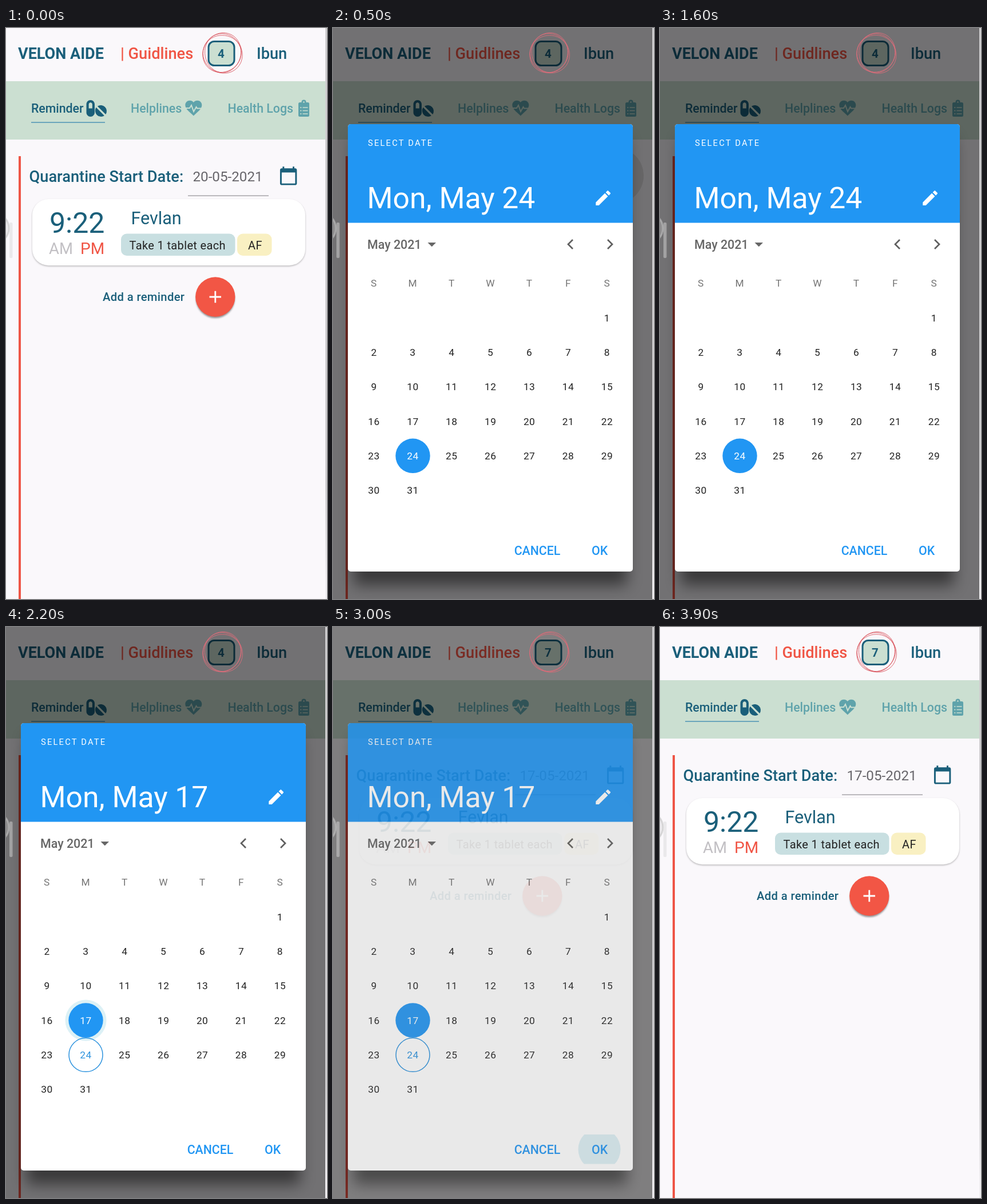
These frames come from a looping animation (561x998 px, 4000 ms). An HTML page:

```html
<!DOCTYPE html>
<html lang="en">
<head>
<meta charset="utf-8">
<title>Quarantine date picker</title>
<style>
html, body { margin: 0; width: 100%; height: 100%; overflow: hidden; background: #faf8fb; }
svg { display: block; width: 561px; height: 998px; font-family: Roboto, sans-serif; }
.m { font-weight: 500; }
.mid { text-anchor: middle; }
</style>
</head>
<body>
<svg viewBox="0 0 561 998">
  <defs>
    <filter id="soft" x="-20%" y="-20%" width="140%" height="140%"><feGaussianBlur stdDeviation="1.6"/></filter>
    <filter id="wide" x="-20%" y="-20%" width="140%" height="140%"><feGaussianBlur stdDeviation="13"/></filter>
    <linearGradient id="edge" x1="0" y1="0" x2="0" y2="1">
      <stop offset=".8" stop-color="#cfced0"/><stop offset=".97" stop-color="#f1eff2"/>
    </linearGradient>
    <clipPath id="card"><rect x="26" y="168" width="498" height="782" rx="5"/></clipPath>
    <clipPath id="btn"><rect x="420" y="887" width="92" height="51.5" rx="5"/></clipPath>
  </defs>

  <g id="page" fill="#1a5f7a">
    <rect width="561" height="998" fill="#faf8fb"/>
    <rect y="93" width="558" height="102" fill="#cbdfd1"/>
    <g class="m" font-size="27.2">
      <text x="21" y="54" font-size="27" font-weight="700">VELON AIDE</text>
      <text x="200" y="54" fill="#f05545">| Guidlines</text>
      <text x="438" y="54">Ibun</text>
    </g>
    <rect x="354" y="23.5" width="45" height="42" rx="10" fill="#cbdfd1" stroke="#1a5f7a" stroke-width="3"/>
    <text id="count" class="mid" x="376" y="52" font-size="20.5" font-weight="700">4</text>

    <g class="m" font-size="21.3">
      <text x="44" y="148">Reminder</text>
      <g fill="#5fa3ab">
        <text x="218" y="148">Helplines</text>
        <text x="387.5" y="148">Health Logs</text>
      </g>
    </g>
    <rect x="44" y="164" width="129" height="2" fill="#6ba5bb"/>
    <g transform="translate(140.5 124) scale(.0645)">
      <path fill-rule="evenodd" d="M112 32C50 32 0 82 0 144v224c0 62 50 112 112 112s112-50 112-112V144C224 82 174 32 112 32zm48 224H64V144c0-26 22-48 48-48s48 22 48 48z"/>
      <path d="M264 230a160 160 0 0 0 222 222zM301 198a160 160 0 0 1 222 222z"/>
    </g>
    <g fill="#5fa3ab">
      <path transform="translate(310.4 122.5) scale(1.45)" d="M12 21.3l-1.4-1.3C5.4 15.4 2 12.3 2 8.5 2 5.4 4.4 3 7.5 3c1.7 0 3.4.8 4.5 2.1C13.1 3.8 14.8 3 16.5 3 19.6 3 22 5.4 22 8.5c0 3.8-3.4 6.9-8.6 11.5z"/>
      <path d="M313 140h8l3-5 4 11 4.5-8 1.5 2.5h8" fill="none" stroke="#cbdfd1" stroke-width="2"/>
      <rect x="511" y="130" width="19" height="25" rx="2.5"/>
      <circle cx="520.5" cy="129.5" r="4"/>
      <circle cx="520.5" cy="129.5" r="1.3" fill="#cbdfd1"/>
      <path d="M514 139h2.5m2 0h9M514 144.5h2.5m2 0h9M514 150h2.5m2 0h9" stroke="#cbdfd1" stroke-width="1.7"/>
    </g>

    <rect x="22" y="224" width="4" height="774" fill="#ee5546"/>
    <text class="m" x="40.5" y="268.5" font-size="27.2">Quarantine Start Date:</text>
    <text id="date" x="326.5" y="267.5" font-size="24.2" fill="#68666b">20-05-2021</text>
    <rect x="318" y="292.5" width="141" height="1.3" fill="#9b999d"/>
    <path transform="translate(476 240.8) scale(1.47)" d="M20 3h-1V1h-2v2H7V1H5v2H4c-1.1 0-2 .9-2 2v16c0 1.1.9 2 2 2h16c1.1 0 2-.9 2-2V5c0-1.1-.9-2-2-2zm0 18H4V8h16z"/>
    <circle id="tapDate" cx="494" cy="258" fill="#000"/>

    <rect x="46" y="300.5" width="477" height="116" rx="28" fill="#000" opacity=".26" filter="url(#soft)"/>
    <rect x="46" y="299" width="477" height="116" rx="28" fill="#fff"/>
    <text x="76" y="358" font-size="50">9:22</text>
    <text x="75" y="395" font-size="27.5" fill="#c2c0c4">AM</text>
    <text x="130" y="395" font-size="28" fill="#f05545">PM</text>
    <text x="218.5" y="343" font-size="30.5">Fevlan</text>
    <rect x="201" y="359.5" width="199.5" height="38.5" rx="10" fill="#c8dfe1"/>
    <rect x="404" y="359.5" width="60.5" height="38.5" rx="10" fill="#f9f0c2"/>
    <g font-size="20" letter-spacing=".36" fill="#222">
      <text x="215.5" y="386.5">Take 1 tablet each</text>
      <text x="423" y="386.5">AF</text>
    </g>
    <text class="m" x="169" y="477" font-size="20.2" letter-spacing=".36">Add a reminder</text>
    <circle cx="365.8" cy="473" r="34" fill="#000" opacity=".42" filter="url(#soft)"/>
    <circle cx="365.8" cy="470" r="34.7" fill="#f25645"/>
    <path d="M355.5 470h20.5m-10.2-10.2v20.4" stroke="#fff" stroke-width="2.8"/>
  </g>

  <rect id="dim" width="558" height="998"/>

  <g id="dialog">
    <rect x="36" y="192" width="478" height="782" rx="6" opacity=".5" filter="url(#wide)"/>
    <g clip-path="url(#card)">
      <rect x="26" y="168" width="498" height="782" fill="#fff"/>
      <rect x="26" y="168" width="498" height="172.5" fill="#2196f3"/>
    </g>
    <g fill="#fff">
      <text x="61" y="205.5" font-size="14.7" letter-spacing="2.2">SELECT DATE</text>
      <text id="title" x="59.5" y="315" font-size="51.6">Mon, May 24</text>
      <path transform="translate(455 280) scale(1.43)" d="M3 17.25V21h3.75L17.81 9.94l-3.75-3.75zM20.71 7.04c.39-.39.39-1.02 0-1.41l-2.34-2.34c-.39-.39-1.02-.39-1.41 0l-1.83 1.83 3.75 3.75z"/>
    </g>
    <text class="m" x="60" y="385.5" font-size="21.4" fill="#666">May 2021</text>
    <path d="M165.5 375h14.5l-7.25 7.25z" fill="#666"/>
    <path d="M419 370l-8 8 8 8M480 370l8 8-8 8" fill="none" stroke="#5f5f5f" stroke-width="2.7"/>
    <circle id="tapDay" cx="139.5" cy="687.5" fill="#62bfd8"/>
    <circle id="pick" cx="139.5" r="30.2" fill="#2196f3"/>
    <circle id="today" cx="139.5" cy="747.8" r="29.5" fill="none" stroke="#2d93de" stroke-width="1.5"/>
    <g id="days" class="mid" font-size="17.3" letter-spacing=".5"></g>
    <g clip-path="url(#btn)"><circle id="tapOk" cx="465.5" cy="913" fill="#62b4cc"/></g>
    <g class="m mid" font-size="21.3" fill="#2196f3">
      <text x="357" y="920.5">CANCEL</text>
      <text x="466" y="920.5">OK</text>
    </g>
  </g>

  <rect x="558" width="3" height="998" fill="url(#edge)"/>
  <circle cx="-22" cy="350" r="27" fill="#d2d2d2" fill-opacity=".3" stroke="#c4c4c4" stroke-width="3" stroke-opacity=".6"/>
  <rect x="6" y="340" width="5.5" height="62" rx="2" fill="#d8d8d8" opacity=".47"/>
  <path id="scribble" fill="none" stroke-width=".8"/>
</svg>
<script>
const LOOP = 4000, OPEN = 333, CLOSE = 2949, FADE = 150, PICK = 2100;
const el = id => document.getElementById(id);
const set = (id, attrs) => { for (const k in attrs) el(id).setAttribute(k, attrs[k]); };
const clamp = x => Math.min(1, Math.max(0, x));
const ramp = (t, a, b) => clamp((t - a) / (b - a));
const mix = (a, b, k) => a + (b - a) * k;

function bezier(x1, y1, x2, y2) {
  const at = (a, b, u) => 3 * a * u * (1 - u) ** 2 + 3 * b * u * u * (1 - u) + u ** 3;
  return x => {
    let lo = 0, hi = 1;
    for (let i = 0; i < 24; i++) {
      const u = (lo + hi) / 2;
      if (at(x1, x2, u) < x) lo = u; else hi = u;
    }
    return x <= 0 ? 0 : x >= 1 ? 1 : at(y1, y2, lo);
  };
}
const ease = bezier(.25, .1, .25, 1), easeOut = bezier(0, 0, .58, 1);

function label(text, col, y, fill) {
  const n = document.createElementNS("http://www.w3.org/2000/svg", "text");
  n.textContent = text;
  n.setAttribute("x", 71.5 + 67.9 * col);
  n.setAttribute("y", y + 6.2);
  n.setAttribute("fill", fill);
  el("days").append(n);
  return n;
}
[..."SMTWTFS"].forEach((c, i) => label(c, i, 446, "#757575"));
const days = [];
for (let d = 1; d <= 31; d++) {
  const cell = d + 5;
  days[d] = label(d, cell % 7, 506.5 + 60.35 * Math.floor(cell / 7), "#222");
}

function ripple(id, t, start, full, fade, end, r0, r1, alpha) {
  set(id, {
    r: mix(r0, r1, easeOut(ramp(t, start, full))),
    opacity: t < start ? 0 : alpha * ramp(t, start, start + 80) * (1 - ramp(t, fade, end))
  });
}

// Loose pen loops that wobble slightly on every step.
function scribble(step) {
  const wob = Math.sin(step * 12.9) * .2;
  let d = "";
  for (let i = 0; i <= 120; i++) {
    const a = i * Math.PI / 20 - 1.9;
    const r = 33.2 + 1.6 * Math.sin(a * .67 + 1 + wob) + 1.1 * Math.sin(2.33 * a + wob);
    const x = 378.4 + r * Math.cos(a), y = 44.2 + (r + .7) * Math.sin(a);
    d += (i ? "L" : "M") + x.toFixed(1) + " " + y.toFixed(1);
  }
  return d;
}

function draw(t) {
  const k = t < CLOSE ? ramp(t, OPEN, OPEN + FADE) : 1 - ramp(t, CLOSE, CLOSE + FADE);
  const shade = ease(k), picked = t >= PICK, saved = t >= CLOSE;
  set("dim", { opacity: .54 * shade });
  set("dialog", { opacity: easeOut(k) });
  el("count").textContent = saved ? 7 : 4;
  el("date").textContent = saved ? "17-05-2021" : "20-05-2021";
  el("title").textContent = "Mon, May " + (picked ? 17 : 24);
  set("pick", { cy: picked ? 687.5 : 747.8 });
  set("today", { opacity: picked ? 1 : 0 });
  days[17].setAttribute("fill", picked ? "#fff" : "#222");
  days[24].setAttribute("fill", picked ? "#2d93de" : "#fff");
  ripple("tapDate", t, 150, 400, 450, 700, 16, 49, .13);
  ripple("tapDay", t, 1930, 2150, 2150, 2450, 12, 36, .27);
  ripple("tapOk", t, 2750, 3000, 3000, 3150, 12, 37, .22);
  const tint = [mix(214, 236, shade), mix(66, 108, shade), mix(76, 124, shade)].map(Math.round);
  set("scribble", { d: scribble(Math.floor(t / 100)), stroke: `rgb(${tint})` });
}

const start = performance.now();
function tick() {
  draw((performance.now() - start) % LOOP);
  requestAnimationFrame(tick);
}
tick();
</script>
</body>
</html>
```
